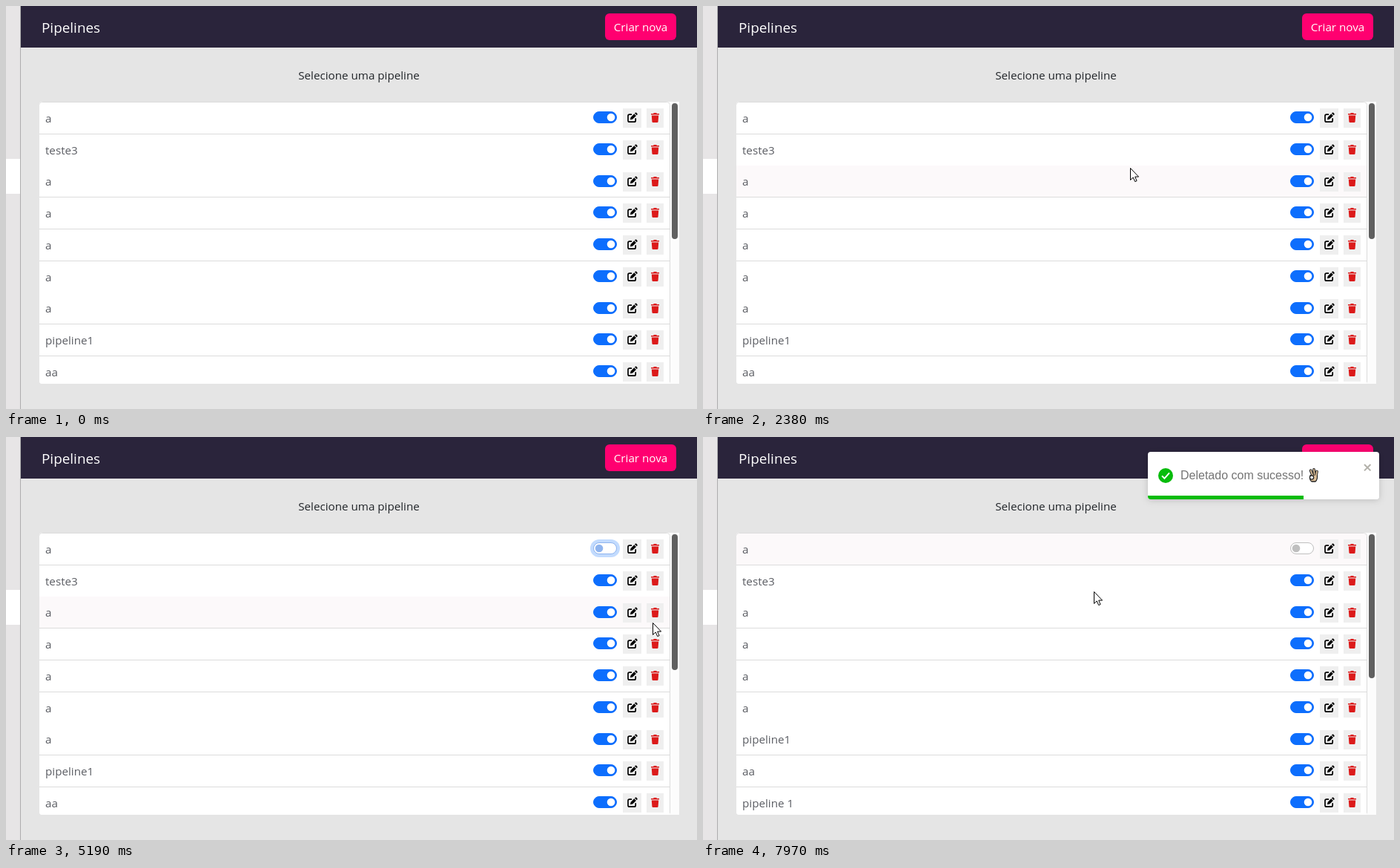
Animation, 932 px wide and 543 px high, one loop 8 s. Source, as an HTML page:

```html
<!DOCTYPE html>
<html lang="pt">
<head>
<meta charset="utf-8">
<title>Pipelines</title>
<style>
html, body { margin: 0; width: 100%; height: 100%; overflow: hidden; background: #e5e5e5; }
svg { display: block; width: 932px; height: 543px; }
text { font: 15.2px "Open Sans", "Noto Sans", sans-serif; white-space: pre; }
#toast text { font: 16px "Liberation Sans", Arial, sans-serif; }
</style>
</head>
<body>
<svg id="stage" viewBox="0 0 932 543">
  <defs>
    <clipPath id="view"><rect x="45" y="129" width="851" height="380" rx="4"/></clipPath>
    <filter id="shadow" x="-10%" y="-30%" width="120%" height="170%">
      <feDropShadow dx="0" dy="1" stdDeviation="5" flood-opacity=".18"/>
    </filter>
    <clipPath id="card"><rect x="600" y="20" width="312" height="64" rx="4"/></clipPath>
    <g id="tools">
      <path d="M832 138h25v26h-25zM864 138h23v26h-23z" fill="#efefef"/>
      <path d="M843.4 146.2h-2.4a2 2 0 0 0-2 2v6a2 2 0 0 0 2 2h6.2a2 2 0 0 0 2-2v-2.4" fill="none" stroke="#000" stroke-width="1.7" stroke-linecap="round"/>
      <path d="M841.9 153.3l.7-3.3 4.7-4.7 2.6 2.6-4.7 4.7zM848 144.6l.8-.8q.8-.6 1.5 0l1.1 1.1q.6.7 0 1.5l-.8.8z"/>
      <path d="M870 145h3l.8-1h3.4l.8 1h3v1.6h-11zM870.8 147.5h9.4l-.6 8.2q-.1 1.3-1.3 1.3h-5.6q-1.2 0-1.3-1.3z" fill="#dc1a1a"/>
    </g>
  </defs>

  <rect width="932" height="543" fill="#e5e5e5"/>
  <rect width="19" height="543" fill="#e7e5e6"/>
  <rect y="206" width="19" height="47" fill="#fff"/>
  <rect x="19" width="1" height="543" fill="#adadad"/>
  <rect x="20" width="912" height="56" fill="#2a243b"/>
  <text x="48" y="36" fill="#fff" style="font-size:18.9px">Pipelines</text>
  <rect x="808" y="10" width="96" height="36" rx="6" fill="#ff0070"/>
  <text x="856" y="34" fill="#fff" text-anchor="middle">Criar nova</text>
  <text x="476" y="99" fill="#212529" text-anchor="middle">Selecione uma pipeline</text>

  <rect x="890" y="129" width="18" height="380" fill="#fcfcfc"/>
  <g clip-path="url(#view)">
    <rect x="45" y="129" width="851" height="380" fill="#fff"/>
    <g id="rows"></g>
    <path d="M44.5 520V133.5a4 4 0 0 1 4-4H891.5a4 4 0 0 1 4 4V520" fill="none" stroke="#dcdcdc"/>
  </g>
  <rect id="thumb" x="898" y="131" width="8" rx="4" fill="#606060"/>

  <g id="toast">
    <rect x="600" y="20" width="312" height="64" rx="4" fill="#fff" filter="url(#shadow)"/>
    <g clip-path="url(#card)"><rect id="bar" x="600" y="79" height="5" fill="#07bc0c"/></g>
    <g id="icon">
      <circle r="10" fill="#07bc0c"/>
      <path d="M-5 .4L-1.6 3.8 5-3.6" fill="none" stroke="#fff" stroke-width="2"/>
    </g>
    <text x="644" y="57" fill="#757575">Deletado com sucesso!</text>
    <g fill="none" stroke-linecap="round">
      <path id="hand" d="M822 51L819.6 45.2M824.6 50L824 44M827 51.5L828 46.5" stroke="#222" stroke-width="3.8"/>
      <path d="M819 52Q817.5 58 821 60H826Q829.5 57 828.2 50.5L822 51Z" fill="#dcbf98" stroke="#222" stroke-width="1.3"/>
      <path d="M822 51L819.6 45.2M824.6 50L824 44M827 51.5L828 46.5" stroke="#dcbf98" stroke-width="1.8"/>
      <circle cx="821" cy="54.5" r="2.6" fill="#fff" stroke="#222" stroke-width="1.3"/>
    </g>
    <path d="M892 37l8.4 8.4m0-8.4l-8.4 8.4" stroke="#b3b1aa" stroke-width="2"/>
  </g>

  <g id="cursor" fill="#fff" stroke="#000" stroke-linejoin="round">
    <path id="arrow" d="M.5.5V16.5L4.2 13 6.7 18.6 9.1 17.6 6.7 12.1H11.6Z"/>
    <path id="pointer" transform="translate(-6.5 0)" d="M6.5.5Q8.5.5 8.5 2.5V7.5Q10 6.6 11 8 12.7 7.3 13.6 8.8 16.5 8.5 16.5 11.5V15Q16.5 17 15 19V22H6.5V20L1 13.5Q.2 12 1.5 11.2 3 10.8 4.5 12.8V2.5Q4.5.5 6.5.5ZM8.5 7.5v4M11 8v3.5M13.6 9v3"/>
  </g>
</svg>
<script>
const LOOP = 8000, PITCH = 42.7;
const TOAST = 6490, RELOAD = 6650;
const before = ['a', 'teste3', 'a', 'a', 'a', 'a', 'a', 'pipeline1', 'aa'];
const after = [...before.filter((_, i) => i !== 2), 'pipeline 1'];

// cursor hotspot: time, x, y
const path = [
  [260, 470, 470], [600, 330, 330], [1020, 226, 205], [1120, 226, 205],
  [1600, 241, 253], [1950, 306, 283], [2730, 795, 165], [2850, 807, 147],
  [3450, 807, 147], [4260, 375, 205], [4470, 271, 234], [4590, 271, 234],
  [4900, 560, 257], [5190, 872, 250], [5290, 871, 243], [5430, 871, 243],
  [5610, 874, 235], [6490, 874, 235], [7270, 700, 160], [7700, 520, 150],
  [7880, 535, 165], [7970, 527, 208]
];

const $ = id => document.getElementById(id);
const set = (el, attrs) => { for (const k in attrs) el.setAttribute(k, attrs[k]); };
const show = (el, on) => set(el, { visibility: on ? 'visible' : 'hidden' });
const ramp = (t, a, b) => Math.min(1, Math.max(0, (t - a) / (b - a)));
const within = (t, a, b) => t >= a && t < b;

$('rows').innerHTML = before.map((_, i) => `
  <g transform="translate(0 ${Math.round(PITCH * i)})">
    <rect class="bg" x="45" y="130" width="850" height="42"/>
    <path d="M45 172.5H895" stroke="#dcdcdc"/>
    <text x="53" y="157" fill="#5b5d63"></text>
  </g>
  <g transform="translate(0 ${Math.round(42.75 * i)})">
    <rect class="ring" x="788" y="138" width="40" height="24" rx="12" fill="#c2dbfe" visibility="hidden"/>
    <rect class="switch" x="792.5" y="142.5" width="31" height="15" rx="7.5" fill="#0d6efd" stroke="#0d6efd"/>
    <circle class="knob" cx="816" cy="150" r="5.3" fill="#fff"/>
    <use href="#tools"/>
  </g>`).join('');
const rowBgs = document.querySelectorAll('.bg');
const labels = document.querySelectorAll('#rows text');
const [ring, toggle, knob] = ['ring', 'switch', 'knob'].map(c => document.querySelector('.' + c));

function cursorAt(t) {
  const n = path.findIndex(p => p[0] > t);
  if (n === 0) return path[0].slice(1);
  if (n < 0) return path[path.length - 1].slice(1);
  const [t0, x0, y0] = path[n - 1], [t1, x1, y1] = path[n];
  const k = ramp(t, t0, t1);
  return [x0 + (x1 - x0) * k, y0 + (y1 - y0) * k];
}

function draw(t) {
  const [x, y] = cursorAt(t);
  const hand = within(t, 2780, 3480) || within(t, 5450, 6520);
  const visible = t >= path[0][0];
  set($('cursor'), { transform: `translate(${Math.round(x)} ${Math.round(y)})` });
  show($('arrow'), visible && !hand);
  show($('pointer'), visible && hand);

  // row highlight trails the cursor slightly
  const hover = visible ? Math.floor((cursorAt(t - 90)[1] - 129.5) / PITCH) : -1;
  const names = t < RELOAD ? before : after;
  rowBgs.forEach((bg, i) => set(bg, { fill: i === hover ? '#fcf9fa' : '#fff' }));
  labels.forEach((el, i) => el.textContent = names[i]);
  set($('thumb'), { height: t < RELOAD ? 183 : 194 });

  const off = t >= 3480, focus = within(t, 3110, 6200);
  const tint = focus ? '#8fb4ee' : '#bfbfbf';
  show(ring, focus);
  set(toggle, { fill: off ? '#fff' : '#0d6efd', stroke: off ? tint : '#0d6efd' });
  set(knob, { fill: off ? tint : '#fff', cx: 816 - 16 * ramp(t, 3480, 3630) });

  show($('toast'), t >= TOAST);
  set($('bar'), { width: 312 - 102 * ramp(t, TOAST, 7970) });
  const zoom = ramp(t, 6470, 6770);
  set($('icon'), {
    transform: `translate(624 52) scale(${0.3 + 0.7 * zoom})`,
    opacity: Math.min(1, 0.1 + 2 * zoom)
  });
}

function tick() {
  draw(performance.now() % LOOP);
  requestAnimationFrame(tick);
}
tick();
</script>
</body>
</html>
```
